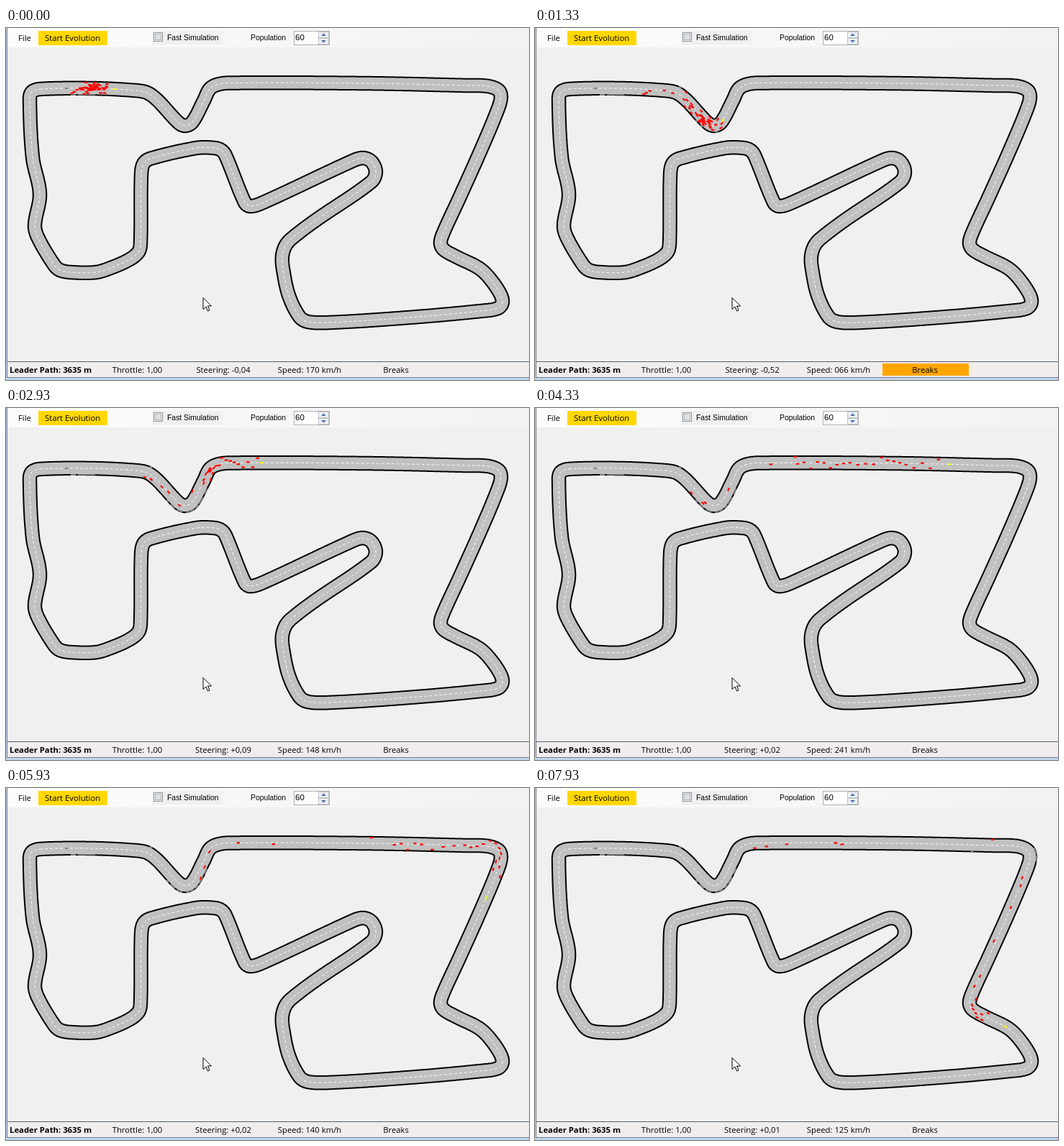
Animation of 727x490 px, one loop 8 s. Source, as an HTML page with a canvas:

```html
<!DOCTYPE html>
<html lang="en">
<head>
<meta charset="utf-8">
<title>Race evolution</title>
<style>
  html, body { margin: 0; width: 100%; height: 100%; overflow: hidden; background: #f0f0f0; }
  canvas { display: block; }
</style>
</head>
<body>
<canvas id="stage" width="727" height="490"></canvas>
<script>
const ctx = document.getElementById('stage').getContext('2d');
const LOOP = 8000, STEP = 200 / 3;
const UI_FONT = '11.3px "Open Sans", sans-serif';
const BOLD_FONT = 'bold ' + UI_FONT;
const SMALL_FONT = '10.4px "Liberation Sans", sans-serif';

// ---- Track: a closed smooth curve through a few centre points ----
const centre = [
  47,85, 120,84, 180,87, 196,90, 210,100, 240,132, 249,136, 259,131, 275,101, 283,85,
  293,79, 310,76.5, 500,77, 640,80, 670,81, 685,87, 688,97, 683,115, 660,170, 630,237,
  608,285, 604,299, 608,308, 625,318, 657,334, 672,348, 687,370, 690,382, 684,390,
  660,394, 560,403, 450,410, 420,409, 408,402, 393,372, 385,335, 384,318, 388,304,
  396,294, 430,268, 508,214, 514,200, 508,186, 497,181, 484,184, 355,244, 339,248,
  332,243, 305,177, 299,170, 290,167, 265,167, 200,182, 191,189, 188,205, 187,300,
  184,312, 172,322, 148,333, 125,340, 90,340, 75,337, 67,330, 45,293, 40,275,
  47,231, 37,180, 33,98, 36,89
];
const knots = [];
for (let i = 0; i < centre.length; i += 2) knots.push({ x: centre[i], y: centre[i + 1] });
const knot = i => knots[(i + knots.length) % knots.length];
let trackLength = 0;
knots.forEach((k, i) => {
  const next = knot(i + 1);
  k.start = trackLength;
  k.chord = Math.hypot(next.x - k.x, next.y - k.y);
  trackLength += k.chord;
});
knots.forEach((k, i) => {
  const a = knot(i - 1), b = knot(i + 1), span = a.chord + k.chord;
  k.dx = (b.x - a.x) / span;
  k.dy = (b.y - a.y) / span;
});

function hermite(p0, m0, p1, m1, length, u) {
  const u2 = u * u, u3 = u2 * u;
  return {
    value: (2 * u3 - 3 * u2 + 1) * p0 + (u3 - 2 * u2 + u) * m0 * length +
           (3 * u2 - 2 * u3) * p1 + (u3 - u2) * m1 * length,
    slope: (6 * u2 - 6 * u) * (p0 - p1) / length +
           (3 * u2 - 4 * u + 1) * m0 + (3 * u2 - 2 * u) * m1
  };
}

function pointAt(s, side = 0) {
  let i = knots.length - 1;
  while (i > 0 && knots[i].start > s) i--;
  const a = knots[i], b = knot(i + 1), u = (s - a.start) / a.chord;
  const x = hermite(a.x, a.dx, b.x, b.dx, a.chord, u);
  const y = hermite(a.y, a.dy, b.y, b.dy, a.chord, u);
  const angle = Math.atan2(y.slope, x.slope);
  return { x: x.value - Math.sin(angle) * side, y: y.value + Math.cos(angle) * side, angle };
}

const track = new Path2D();
for (let s = 0; s < trackLength; s += 1.5) {
  const p = pointAt(s);
  track.lineTo(p.x, p.y);
}
track.closePath();

// ---- Motion: distance along the track at a few times ----
const times = [0, 1330, 2930, 4330, 5930, 7200, 7930];
const KMH = 0.0008; // pixels per ms for 1 km/h
const leader = {
  path: [104, 235, 358, 578, 759, 916, 980],
  slopes: [170, 66, 148, 241, 140, 82, 125].map(v => v * KMH)
};
const stragglers = [
  [45, 105, 149, 185, 242, 274, 307],
  [48, 108, 160, 206, 258, 302, 324],
  [52, 113, 178, 208, 280, 326, 352],
  [56, 133, 190, 252, 325, 385, 420],
  [60, 145, 213, 330, 374, 409, 429],
  [64, 160, 245, 364, 510, 590, 638]
];
const stragglerSides = [7, 5, 2, 0, 2, -8];
const pack = [
  [58, 164, 262, 367, 542, 677, 729],
  [66, 180, 279, 404, 580, 713, 773],
  [71, 200, 284, 440, 640, 775, 878],
  [76, 207, 303, 484, 674, 820, 910],
  [82, 215, 325, 518, 700, 866, 935],
  [93, 231, 352, 563, 724, 889, 950]
];
const PACK_SIZE = 21, DIP_CRASHES = 20;

const random = n => { const v = Math.sin(n * 12.9898) * 43758.5453; return v - Math.floor(v); };
const clamp = v => Math.max(0, Math.min(1, v));
const mix = (a, b, u) => a + (b - a) * u;

function steadySlopes(path) {
  const rate = path.slice(1).map((p, i) => (p - path[i]) / (times[i + 1] - times[i]));
  return path.map((_, i) => {
    const a = rate[Math.max(0, i - 1)], b = rate[Math.min(rate.length - 1, i)];
    return 2 * a * b / (a + b);
  });
}

function travel({ path, slopes }, t) {
  let i = times.length - 2;
  while (i > 0 && times[i] > t) i--;
  const length = times[i + 1] - times[i];
  return hermite(path[i], slopes[i], path[i + 1], slopes[i + 1], length, (t - times[i]) / length);
}

function packPath(rank) {
  const at = rank * (pack.length - 1), i = Math.min(pack.length - 2, Math.floor(at));
  return pack[i].map((s, k) => mix(s, pack[i + 1][k], at - i));
}

const cars = [];
const addCar = (path, side, crash = Infinity, crashSide = 9) =>
  cars.push({ path, slopes: steadySlopes(path), side, crash, crashSide });
const randomSide = n => (random(n) + random(n + 50) - 1) * 9;

for (let i = 0; i < DIP_CRASHES; i++) {
  const first = i === 0;
  addCar(packPath(random(i + 3)), randomSide(i + 7),
         first ? 151 : 198 + 58 * random(i + 20), first ? -9 : 9);
}
stragglers.forEach((path, i) => addCar(path, stragglerSides[i]));
for (let i = 0; i < PACK_SIZE; i++) {
  const path = packPath(i / (PACK_SIZE - 1)), side = randomSide(i + 100);
  if (i === 2) addCar(path, 8, 610, 9);
  else if (i % 2 && i > 2 && i < 14) addCar(path, side, 688 + 15 * random(i + 200), -9);
  else addCar(path, side);
}

const steering = [
  [0, -.04], [450, .02], [650, .4], [900, .05], [1150, -.52], [1450, -.52], [1800, -.1],
  [2050, .45], [2450, .25], [2930, .09], [4330, .02], [4950, .1], [5150, .52], [5400, .5],
  [5930, .02], [6900, 0], [7100, -.52], [7300, -.52], [7600, -.08], [7930, .01]
];
const braking = [[600, 1500], [1900, 2100], [4650, 5200], [6700, 7300], [7820, 7920]];

function steeringAt(t) {
  const i = Math.max(1, steering.findIndex(k => k[0] >= t));
  const [t0, a] = steering[i - 1], [t1, b] = steering[i];
  return mix(a, b, (t - t0) / (t1 - t0));
}

// ---- Drawing ----
function rect(color, x, y, w, h) {
  ctx.fillStyle = color;
  ctx.fillRect(x, y, w, h);
}
function box(fill, border, x, y, w, h) {
  rect(border, x, y, w, h);
  rect(fill, x + 1, y + 1, w - 2, h - 2);
}
function text(label, x, y, font = UI_FONT, align = 'left') {
  ctx.font = font;
  ctx.textAlign = align;
  ctx.fillStyle = '#000';
  ctx.fillText(label, x, y);
}
function polygon(fill, points) {
  ctx.beginPath();
  points.forEach(([x, y]) => ctx.lineTo(x, y));
  ctx.closePath();
  ctx.fillStyle = fill;
  ctx.fill();
}
function strokeTrack(color, width, dash = []) {
  ctx.strokeStyle = color;
  ctx.lineWidth = width;
  ctx.lineJoin = 'round';
  ctx.setLineDash(dash);
  ctx.stroke(track);
  ctx.setLineDash([]);
}
function drawCar(color, s, side, length = 4.5, width = 2.2) {
  const p = pointAt(s, side);
  ctx.save();
  ctx.translate(p.x, p.y);
  ctx.rotate(p.angle);
  rect(color, -length / 2, -width / 2, length, width);
  ctx.restore();
}

function drawToolbar() {
  const shade = ctx.createLinearGradient(0, 0, 727, 0);
  shade.addColorStop(0, '#fcfcfc');
  shade.addColorStop(1, '#f2f2f2');
  rect(shade, 2, 0, 725, 27);
  text('File', 17, 18);
  rect('#ffd700', 45, 4, 96, 20);
  text('Start Evolution', 54, 18);
  rect('#f0f0f0', 203, 4, 99, 19);
  box('#f4f4f4', '#8e8f8f', 205, 6, 13, 13);
  box('#dfe2e5', '#aeb3b9', 207, 8, 9, 9);
  text('Fast Simulation', 224, 17, SMALL_FONT);
  text('Population', 340, 17, SMALL_FONT);
  box('#fff', '#abadb3', 400, 4, 50, 20);
  text('60', 402, 17, '11.5px "Liberation Sans", sans-serif');
  box('#eef0f3', '#bfc5cc', 434, 5, 15, 9);
  box('#eef0f3', '#bfc5cc', 434, 14, 15, 9);
  polygon('#4a6fc0', [[438, 11], [441.5, 7.5], [445, 11]]);
  polygon('#4a6fc0', [[438, 17], [441.5, 20.5], [445, 17]]);
}

function drawStatus(t, speed) {
  rect('#f1eded', 2, 465, 725, 21);
  rect('#5a6070', 2, 464, 725, 1);
  rect('#6f7f96', 1, 486, 726, 1);
  rect('#c3d5e9', 0, 487, 727, 3);
  if (braking.some(([from, to]) => t >= from && t < to)) rect('#ffa500', 483, 467, 120, 17);
  const steer = steeringAt(t);
  const steerLabel = (steer < 0 ? '-' : '+') + Math.abs(steer).toFixed(2).replace('.', ',');
  text('Leader Path: 3635 m', 5, 480, BOLD_FONT);
  text('Throttle: 1,00', 182.5, 480, UI_FONT, 'center');
  text('Steering: ' + steerLabel, 302, 480, UI_FONT, 'center');
  text('Speed: ' + String(Math.round(speed)).padStart(3, '0') + ' km/h', 422, 480, UI_FONT, 'center');
  text('Breaks', 542, 480, UI_FONT, 'center');
}

function drawCursor() {
  const tip = [[0, 0], [0, 16], [4, 12.5], [6.5, 18.5], [9, 17.5], [6.5, 11.5], [11.5, 11.5]];
  polygon('#fff', tip.map(([x, y]) => [x + 274, y + 375.5]));
  ctx.strokeStyle = '#000';
  ctx.lineWidth = 1;
  ctx.stroke();
}

function draw(t) {
  rect('#f0f0f0', 0, 0, 727, 490);
  drawToolbar();
  strokeTrack('#000', 20.5);
  strokeTrack('#c0c0c0', 16.5);
  strokeTrack('#fff', 1, [4, 3]);

  rect('#808080', 82, 83, 4, 2);
  rect('#808080', 90, 92, 7, 2);
  rect('#808080', 100, 92, 24, 1.5);
  const states = cars.map(car => {
    const s = travel(car, t).value, dead = s >= car.crash;
    const side = mix(car.side, car.crashSide, clamp((s - car.crash + 40) / 40));
    return { s: Math.min(s, car.crash), side, dead };
  });
  states.filter(c => c.dead).forEach(c => drawCar('#808080', c.s, c.side, 4, 2));
  states.filter(c => !c.dead).forEach(c => drawCar('#f00', c.s, c.side));
  const lead = travel(leader, t);
  drawCar('#ff0', lead.value, 0, 5, 2);

  drawCursor();
  drawStatus(t, lead.slope / KMH);
  rect('#c3d5e9', 0, 0, 1, 490);
  rect('#6f7f96', 1, 0, 1, 487);
}

function frame(now) {
  const step = Math.min(119, Math.floor((now % LOOP + 4) / STEP));
  draw(Math.round(step * STEP / 10) * 10);
  requestAnimationFrame(frame);
}
draw(0);
requestAnimationFrame(frame);
</script>
</body>
</html>
```
